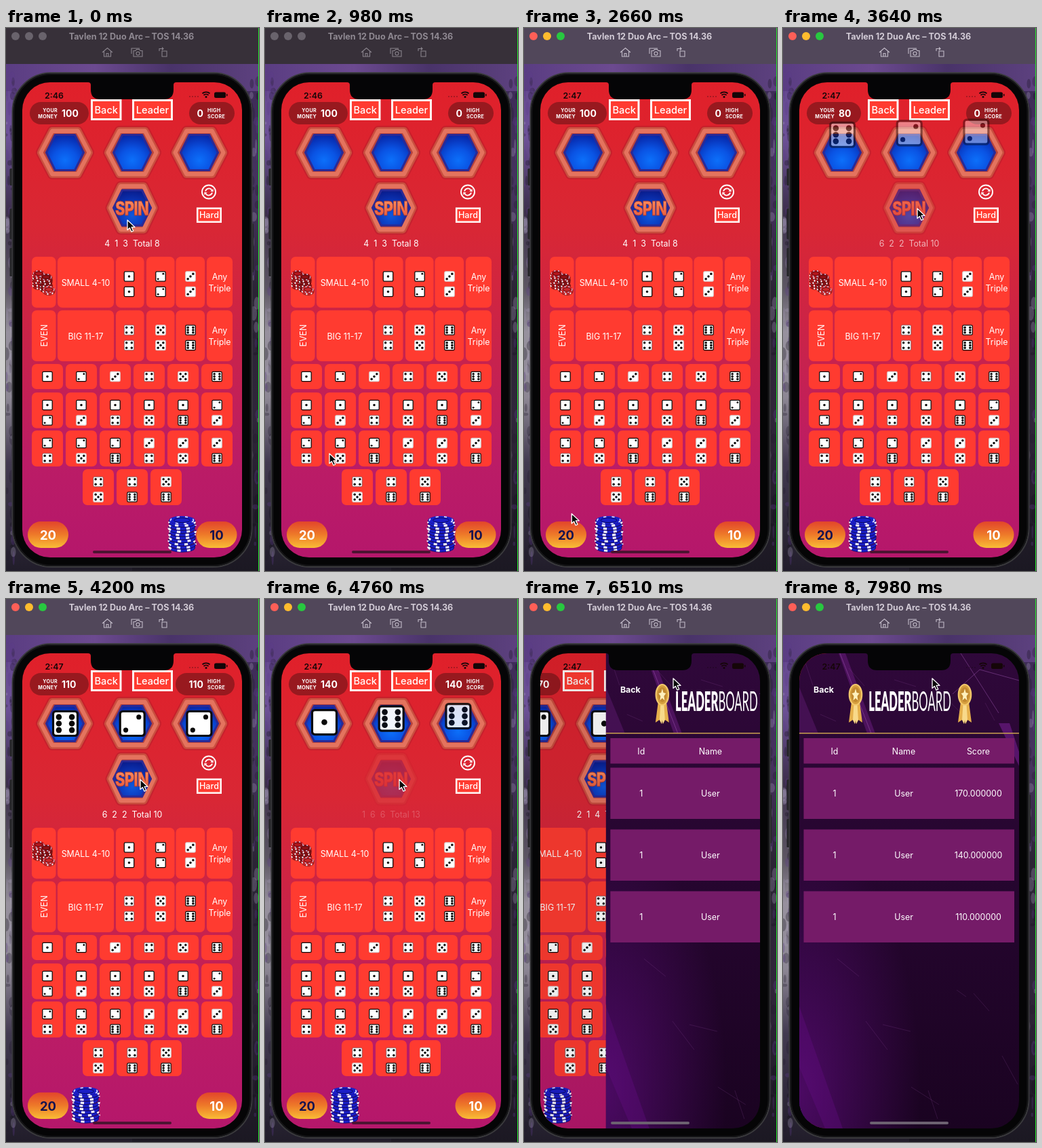
An HTML page for the animation above (8 s loop, 373 by 800 pixels).

```html
<!DOCTYPE html>
<html lang="en">
<head>
<meta charset="utf-8">
<title>Dice game</title>
<style>
  html, body { margin: 0; width: 100%; height: 100%; overflow: hidden; background: #241f2b; }
  svg { display: block; width: 100%; height: 100%; }
  text { font-family: Inter, "Open Sans", sans-serif; font-size: 12.4px; fill: #fff; text-anchor: middle; dominant-baseline: central; }
  .left { text-anchor: start; }
  .right { text-anchor: end; }
  .tiny { font-size: 7.2px; font-weight: 700; letter-spacing: .3px; }
  .value { font-size: 14px; font-weight: 700; }
</style>
</head>
<body>
<svg id="stage" viewBox="0 0 373 800" xmlns="http://www.w3.org/2000/svg"></svg>
<script>
const LOOP = 8000;
const stage = document.getElementById('stage');

const text = (str, x, y, attrs = '') => `<text x="${x}" y="${y}" ${attrs}>${str}</text>`;
const rect = (x, y, w, h, r, attrs) => `<rect x="${x}" y="${y}" width="${w}" height="${h}" rx="${r}" ${attrs}/>`;
const group = (body, attrs = '') => `<g ${attrs}>${body}</g>`;
const at = (x, y) => `transform="translate(${x} ${y})"`;
const path = (d, attrs) => `<path d="${d}" ${attrs}/>`;
const gradient = (id, stops, attrs = 'x2="0" y2="1"', kind = 'linear') =>
  `<${kind}Gradient id="${id}" ${attrs}>${stops.map(([o, c]) => `<stop offset="${o}" stop-color="${c}"/>`).join('')}</${kind}Gradient>`;

let seed = 7;
const random = () => (seed = seed * 16807 % 2147483647) / 2147483647;

// Pips use a 3x3 layout numbered row by row.
const PIPS = ['', '4', '26', '246', '0268', '02468', '035268'];
function dieFace(n) {
  const [line, width] = { 3: ['#d9d4d4', 3], 4: ['#55525a', 1.6], 5: ['#d9d4d4', 3] }[n] || ['#0a0a0a', 3.2];
  const r = n === 2 ? 3.6 : 4.3;
  const pips = [...PIPS[n]].map(p =>
    `<circle cx="${(p % 3 - 1) * 9.6}" cy="${(Math.floor(p / 3) - 1) * 9.6}" r="${r}" fill="#0a0a0a"/>`).join('');
  return rect(-18, -18, 36, 36, 4, `fill="#fff" stroke="${line}" stroke-width="${width}"`) + pips;
}
const die = (n, x, y) => `<use href="#die${n}" transform="translate(${x} ${y}) scale(.4)"/>`;

function hexPath(rx, ry) {
  const k = rx * .53;
  return `M${-rx} 0L${-k} ${-ry}H${k}L${rx} 0L${k} ${ry}H${-k}Z`;
}
const hexagon = (x, y, rx, ry, fill) => group(
  path(hexPath(rx, ry), 'fill="none" stroke="#7c1420" stroke-width="16" opacity=".22"') +
  path(hexPath(rx, ry), 'fill="#b8433a" stroke="#c9503f" stroke-width="12"') +
  path(hexPath(rx, ry), 'fill="none" stroke="#e4735e" stroke-width="7"') +
  path(hexPath(rx - 4.5, ry - 4.5), 'fill="none" stroke="#b9443c" stroke-width="3"') +
  path(hexPath(27.5, 26), `fill="${fill}" stroke="#2a2a96" stroke-width="3"`),
  `${at(x, y)} stroke-linejoin="round"`);

function chipStack(count, body, edge, dash) {
  let out = '';
  for (let i = 0; i < count; i++) {
    const x = [0, 1, -.6, .6][i % 4];
    out += group(
      path('M-19 0A19 6 0 0 0 19 0V4.2A19 6 0 0 1-19 4.2Z', `fill="${body}" stroke="${edge}" stroke-width=".8"`) +
      path('M-19 2.2A19 6 0 0 0 19 2.2', `fill="none" stroke="#f3f1fa" stroke-width="3.2" stroke-dasharray="${dash}" stroke-dashoffset="${i % 3 * 1.6}"`),
      at(x, -i * 4.6));
  }
  const top = -(count - 1) * 4.6;
  return out + `<ellipse cy="${top}" rx="19" ry="6.2" fill="${body}"/>` +
    `<ellipse cy="${top}" rx="17" ry="5.2" fill="none" stroke="#d9d9ff" stroke-width="1.8" stroke-dasharray="4 8"/>` +
    `<ellipse cy="${top}" rx="12" ry="3.4" fill="${body}" stroke="${edge}"/>`;
}

const boxed = (label, x, y, w, h, line, size) =>
  rect(x, y, w, h, 0, `fill="#ff3b30" stroke="#fff5f3" stroke-width="${line}"`) +
  text(label, x + w / 2, y + h / 2, `style="font-size:${size}px;font-weight:500"`);

function board() {
  const cell = (x, y, w, h) => rect(x, y, w, h, 7, 'fill="#ff3b30"');
  const columns = [[38, 35.5], [76, 83], [162, 41.5], [207, 41.5], [250.5, 42.5], [296, 38]];
  let out = '';
  [337, 416].forEach((y, row) => {
    columns.forEach(([x, w]) => out += cell(x, y, w, 75));
    out += text(row ? 'BIG 11-17' : 'SMALL 4-10', 117.5, y + 38) +
      text('Any', 315, y + 29.5) + text('Triple', 315, y + 46);
    [181.5, 228, 272].forEach((x, i) => {
      const n = row * 3 + i + 1;
      out += die(n, x, y + 29) + die(n, x, y + 51.5);
    });
  });
  out += text('EVEN', 0, 0, 'transform="translate(56 453) rotate(-90)"');
  const redStack = (count, color, x, y) => group(chipStack(count, color, '#2e080a', '4 11'), at(x, y));
  out += group(redStack(5, '#b3151b', -15, 0) + redStack(5, '#8f1015', 9, 6) + redStack(1, '#c9262a', 18, 10),
    'transform="translate(55 377) scale(.46 .82)"');

  const rows = [
    [495, 37, 38, ['1', '2', '3', '4', '5', '6']],
    [537, 52.5, 38, ['12', '13', '14', '15', '16', '23']],
    [593, 53, 38, ['24', '25', '26', '34', '35', '36']],
    [650, 53, 113, ['45', '46', '56']]];
  for (const [y, h, left, combos] of rows) combos.forEach((combo, i) => {
    const x = left + i * 50;
    out += cell(x, y, 46, h);
    [...combo].forEach((n, j) => out += die(n, x + 23, y + 18.5 + j * 22.5));
  });
  return out;
}

const betButton = (value, x, id) =>
  rect(x, 727, 60, 39, 19.5, 'fill="url(#bet)"') +
  text(value, x + 30, 746.5, `id="${id}" style="font-size:18.5px;font-weight:700"`);

const gameScreen = () =>
  rect(24, 80, 324, 700, 0, 'fill="url(#game)"') +
  rect(35, 109, 88, 33, 16.5, 'id="moneyPill" fill="#98191f"') +
  text('YOUR', 76, 121, 'class="tiny right"') + text('MONEY', 76, 130, 'class="tiny right"') +
  text('', 82, 125.5, 'id="money" class="value left"') +
  rect(270, 109, 67, 33, 16.5, 'id="scorePill" fill="#98191f"') +
  text('HIGH', 297, 121, 'class="tiny left"') + text('SCORE', 297, 130, 'class="tiny left"') +
  text('', 291, 125.5, 'id="score" class="value right"') +
  boxed('Back', 126.5, 106.5, 42.5, 28, 3, 14.6) + boxed('Leader', 187.5, 106.5, 57, 28, 3, 14.6) +
  [87, 186, 285].map((x, i) => hexagon(x, 183.5, 35, 31.5, 'url(#blue)') + `<use id="roll${i}" href="#die1"/>`).join('') +
  group(hexagon(186, 265, 31.5, 31.5, 'url(#deepBlue)') +
    `<text transform="translate(185.5 265.5) scale(1 1.3)" style="font:900 22px Inter,sans-serif;letter-spacing:-.8px;fill:url(#copper);stroke:#a8382e;stroke-width:.6px">SPIN</text>`, 'id="spin"') +
  text('', 186, 317, 'id="result"') +
  group(`<circle r="10" fill="none" stroke="#fff" stroke-width="1.9"/>` +
    path('M-5-1A5.3 5.3 0 0 1 4.5-2.8M5 1A5.3 5.3 0 0 1-4.5 2.8', 'fill="none" stroke="#fff" stroke-width="1.8"') +
    path('M6.6-4.5V-.2L2.3-1ZM-6.6 4.5V.2L-2.3 1Z', 'fill="#fff"'), at(299, 241.5)) +
  boxed('Hard', 282.2, 265.7, 34.5, 20, 2.6, 12.6) +
  board() + betButton(20, 32, 'bet20') + betButton(10, 280.5, 'bet10') +
  group(chipStack(9, '#1a1ec8', '#0a0b62', '5 9'), 'id="chip"');

function medal(x) {
  return group(
    path('M-5-10L-10 28L-4 24L-1 30L0 24L1 30L4 24L10 28L5-10Z', 'fill="#e6b04c"') +
    path('M-2-6L-4 24L-1 30L0 24L1 30L4 24L2-6Z', 'fill="#f8d98a"') +
    `<ellipse cy="-13" rx="9.300" ry="15" fill="#d69f3f" stroke="#f3c96c" stroke-width="2"/>` +
    `<ellipse cy="-13" rx="6.500" ry="11" fill="#c38a30"/>` +
    path('M0-22L1.600-16L5.500-15L2.500-11L3.500-4.500L0-8L-3.500-4.500L-2.500-11L-5.500-15L-1.600-16Z', 'fill="#fff0bd"'), at(x, 154));
}

function leaderScreen() {
  const row = (y, h, cells) => rect(30.5, y, 310.5, h, 0, 'fill="#751b68"') +
    cells.map((c, i) => text(c, [76, 178, 288][i], y + h / 2 + .5)).join('');
  const streak = (d, fill, opacity) => path(d, `fill="${fill}" opacity="${opacity}"`);
  const scratches = Array.from({ length: 14 }, (_, i) => {
    const x = 30 + i * 67 % 310, y = i < 6 ? 85 + i * 17 : 520 + i * 97 % 240;
    return `M${x} ${y}l${14 + i % 4 * 9} ${42 - i % 3 * 16}`;
  }).join('');
  return rect(24, 80, 324, 700, 0, 'fill="url(#night)"') + rect(24, 80, 324, 700, 0, 'fill="url(#glow)"') +
    streak('M82 80H92L136 198H124Z', '#74208a', .45) + streak('M24 130L52 198H24Z', '#7a2691', .3) +
    streak('M318 183L334 183L348 225V246Z', '#8122a0', .5) +
    streak('M24 600L88 780H62L24 690Z', '#650c83', .35) +
    path('M84 80L130 198M262 80L318 168M348 120L290 104L250 140', 'stroke="#a45cb8" stroke-width=".9" opacity=".5" fill="none"') +
    path(scratches, 'stroke="#a45cb8" stroke-width=".6" opacity=".3" fill="none"') +
    rect(24, 197, 324, 1.5, 0, 'fill="#c9a04f"') +
    text('Back', 60, 133, 'style="font-weight:700"') + medal(107) + medal(268) +
    `<text transform="translate(187 149.500) scale(1 2.4)" style="font:400 16.700px Lato,sans-serif"><tspan font-weight="900">LEADER</tspan>BOARD</text>` +
    row(205, 37.5, ['Id', 'Name', 'Score']) +
    [170, 140, 110].map((s, i) => row(248.5 + i * 91, 75.5, [1, 'User', s + '.000000'])).join('');
}

function wallpaper() {
  let specks = '';
  for (let i = 0; i < 150; i++) {
    const x = i % 3 ? random() * 14 : 360 + random() * 12;
    const shade = ['#15101c', '#a79bb8', '#5c3c8c', '#221a2c'][i % 4];
    specks += `<ellipse cx="${x}" cy="${60 + random() * 740}" rx="${1 + random() * 4}" ry="${2 + random() * 9}" fill="${shade}" opacity=".3"/>`;
  }
  return rect(0, 0, 373, 800, 0, 'fill="url(#wall)"') + rect(186, 53, 187, 747, 0, 'fill="url(#wallRight)"') +
    rect(0, 53, 373, 40, 0, 'fill="url(#wallTop)"') + specks;
}

const phone = () =>
  [[207, 25], [266, 45], [324, 42]].map(([y, h]) => rect(5.5, y, 5, h, 1.5, 'fill="#252528"')).join('') +
  rect(361, 288, 4, 72, 1.5, 'fill="#252528"') +
  rect(9.5, 66, 353, 728, 57, 'fill="#050506" stroke="#3a3a3d" stroke-width="2"') +
  rect(11.5, 68, 349, 724, 55, 'fill="none" stroke="#151517" stroke-width="2"');

const titleBar = () =>
  rect(0, 0, 373, 53, 0, 'id="bar"') +
  [14, 34, 54].map((x, i) => `<circle id="light${i}" cx="${x}" cy="12" r="6"/>`).join('') +
  group(text('Tavlen 12 Duo Arc – TOS 14.36', 185, 12, 'style="font-size:12.6px;font-weight:700;fill:inherit"') +
    group(path('M142 36L149.500 29.500L157 36M144.500 34.500V42H154.500V34.500M148 42V37.500H151V42', '') +
      path('M185 38V30H197M188 33.500H191L192.500 31.500H196.500L198 33.500H201V42H188Z', '') + '<circle cx="194.500" cy="37.500" r="2.500"/>' +
      path('M230 34H237V42H230ZM226 34V30.500H232M230 28.500L232 30.500L230 32.500', ''),
      'fill="none" stroke="currentColor" stroke-width="1.1"'), 'id="barInk"');

const status = () =>
  text('', 71, 99, 'id="clock" style="font-size:12.4px;font-weight:600;fill:#150608"') +
  group([271, 275, 279, 283].map(x => `<circle cx="${x}" cy="101" r=".9" fill="#150608" opacity=".4"/>`).join('') +
    path('M289.500 96.500A8 8 0 0 1 300.500 96.500M291.500 99A5 5 0 0 1 298.500 99', 'fill="none" stroke="#150608" stroke-width="1.8"') +
    '<circle cx="295" cy="101.500" r="1.500" fill="#150608"/>' +
    rect(307, 94.5, 17, 8.5, 2.5, 'fill="#150608"') + rect(325, 97, 1.5, 3.5, .7, 'fill="#150608"')) +
  path('M121 80H251Q247 80 247 84V91Q247 105 233 105H139Q125 105 125 91V84Q125 80 121 80Z', 'fill="#050506"') +
  rect(128, 770, 116, 4, 2, 'id="homeBar"');

const tooltip = () => group(
  path('M-20 756.500H130Q138 756.500 138 764V776Q138 783.500 130 783.500H67L57 790L47 783.500H-20Z',
    'fill="#471833" fill-opacity=".95" stroke="#83576d" stroke-width="1"') +
  text('Quolm Plays Launcher', 124, 770, 'class="right" style="font-size:13px"'), 'id="tooltip"');

stage.innerHTML = `<defs>
  ${gradient('game', [[0, '#e0202a'], [.3, '#d92734'], [.55, '#c9234a'], [.8, '#bb1c66'], [1, '#b5176b']])}
  ${gradient('bet', [[0, '#e2452b'], [.5, '#ee7a29'], [1, '#f9bd36']])}
  ${gradient('copper', [[0, '#ff9a68'], [.5, '#f4724a'], [1, '#e2553c']])}
  ${gradient('blue', [[0, '#0c70fa'], [.45, '#0a54e4'], [1, '#0726a8']], 'cy=".72" r=".72"', 'radial')}
  ${gradient('deepBlue', [[0, '#1058dc'], [.5, '#0b38bc'], [1, '#091c8c']], 'cy=".72" r=".72"', 'radial')}
  ${gradient('night', [[0, '#2f083a'], [.16, '#2c0736'], [.6, '#23052c'], [1, '#1a0321']])}
  ${gradient('wall', [[0, '#5b3f84'], [.2, '#6d5198'], [.34, '#3c2f4b'], [.48, '#5d5763'], [.56, '#97919e'], [.68, '#8d8794'], [.8, '#423a50'], [1, '#211d2a']])}
  ${gradient('wallRight', [[0, '#3c2a56'], [.25, '#46345f'], [.45, '#2b2435'], [.7, '#30263a'], [1, '#1b1822']])}
  ${gradient('wallTop', [[0, '#5a3d82'], [.35, '#6c4a90'], [.65, '#493369'], [1, '#5d417f']], '')}
  <radialGradient id="glow" cx="0" cy=".92" r=".55"><stop stop-color="#5b0c78" stop-opacity=".75"/><stop offset="1" stop-color="#5b0c78" stop-opacity="0"/></radialGradient>
  <clipPath id="screen">${rect(24, 80, 324, 700, 41, '')}</clipPath>
  ${[1, 2, 3, 4, 5, 6].map(n => `<g id="die${n}">${dieFace(n)}</g>`).join('')}
</defs>` +
  wallpaper() + phone() +
  group(group(gameScreen(), 'id="game-view"') + rect(24, 80, 324, 700, 0, 'id="dim"') +
    group(leaderScreen(), 'id="leader-view"') + status(), 'clip-path="url(#screen)"') +
  titleBar() + rect(372, 0, 1, 800, 0, 'fill="#22e629"') + tooltip() +
  path('M0 0V14.500L3.400 11.400L6 17.200L8.700 16L6.200 10.400H11Z', 'id="cursor" fill="#080808" stroke="#fff" stroke-width="1.3" stroke-linejoin="round"');

const $ = Object.fromEntries([...stage.querySelectorAll('[id]')].map(node => [node.id, node]));
const set = (node, attrs) => { for (const k in attrs) node.setAttribute(k, attrs[k]); };
const move = (node, x, y) => node.setAttribute('transform', `translate(${x} ${y})`);
const clamp = v => Math.min(1, Math.max(0, v));
const ramp = (t, from, to) => clamp((t - from) / (to - from));
const smooth = p => p * p * (3 - 2 * p);
const latest = (list, t) => list.filter(item => item[0] <= t).pop();

// [time, x, y]
const CURSOR = [[0, 179, 283], [500, 179, 283], [1250, 60, 770], [1820, 52, 763], [2080, 52, 763], [2320, 61, 748],
  [2550, 61, 748], [3250, 198, 266], [5350, 198, 266], [5750, 223, 115], [6050, 223, 115], [6350, 220, 117], [LOOP, 220, 117]];
// [time, faces]
const SPINS = [[3445, [6, 2, 2]], [4330, [1, 6, 6]], [5000, [2, 1, 4]]];
// [time, money, high score]
const BALANCE = [[0, 100, 0], [3445, 80, 0], [3900, 110, 110], [4330, 140, 140], [5000, 170, 170]];
const PILL = [0, 67, 80, 87];
const DROP = 450;

function drawCursor(t) {
  const i = CURSOR.findIndex(p => p[0] > t);
  const [t0, x0, y0] = CURSOR[i - 1], [t1, x1, y1] = CURSOR[i];
  const p = smooth(ramp(t, t0, t1));
  move($.cursor, x0 + (x1 - x0) * p, y0 + (y1 - y0) * p);
}

function drawSpin(t) {
  const spin = latest(SPINS, t);
  const faces = spin ? spin[1] : [4, 1, 3];
  const age = spin ? t - spin[0] : 0;
  const fade = 1 - .82 * (ramp(age, 0, DROP) - ramp(age, DROP, DROP + 170));
  $.result.textContent = [...faces, 'Total ' + faces.reduce((a, b) => a + b)].join('\u00a0\u00a0');
  set($.spin, { opacity: fade });
  set($.result, { opacity: fade });
  faces.forEach((n, i) => {
    const p = clamp(age / DROP * [1, .88, .8][i]);
    set($['roll' + i], { href: '#die' + n, opacity: spin ? clamp(p * 1.12) : 0 });
    move($['roll' + i], 87.5 + i * 98.7, 137 + 46.5 * p);
  });
}

function drawBalance(t) {
  const [, money, score] = latest(BALANCE, t);
  $.money.textContent = money;
  $.score.textContent = score;
  const scoreWidth = PILL[String(score).length];
  set($.moneyPill, { width: PILL[String(money).length] });
  set($.scorePill, { width: scoreWidth, x: 337 - scoreWidth });
}

function drawWindow(t) {
  const active = t >= 2380;
  set($.bar, { fill: active ? '#51475a' : '#373039' });
  ['#ff5f57', '#febc2e', '#28c840'].forEach((c, i) => set($['light' + i], { fill: active ? c : '#69636c' }));
  set($.barInk, { fill: active ? '#d2cbd6' : '#8f8992', color: active ? '#c2bbc8' : '#89838c' });
  $.clock.textContent = active ? '2:47' : '2:46';
  set($.tooltip, { opacity: t >= 1250 && t < 2120 ? 1 : 0 });
}

function drawBet(t) {
  const p = smooth(ramp(t, 2420, 2700));
  move($.chip, 259.5 - 142 * p, 762);
  $.bet20.style.fill = p > 0 ? '#15124f' : '#fff';
  $.bet10.style.fill = p > 0 ? '#fff' : '#15124f';
}

function drawPush(t) {
  const p = 1 - (1 - ramp(t, 6279, 6979)) ** 3;
  move($['game-view'], -97 * p, 0);
  move($['leader-view'], 324 * (1 - p), 0);
  set($.dim, { fill: '#000', opacity: .1 * p });
  set($.homeBar, { fill: p > .5 ? '#6c6170' : '#4d1432' });
}

const start = performance.now();
function frame() {
  const t = (performance.now() - start) % LOOP;
  [drawCursor, drawSpin, drawBalance, drawWindow, drawBet, drawPush].forEach(draw => draw(t));
  requestAnimationFrame(frame);
}
frame();
</script>
</body>
</html>
```
